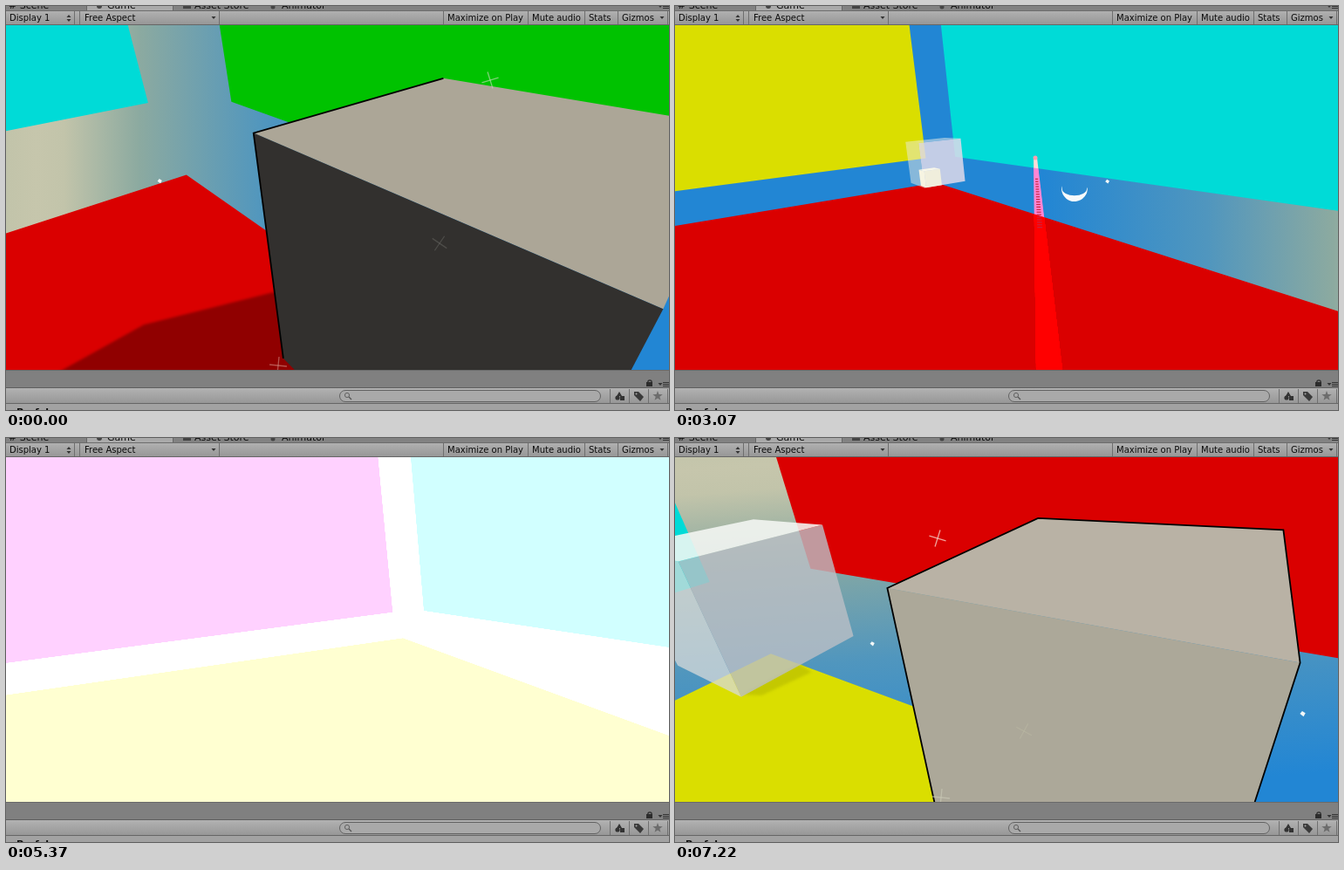
Recreate the animation shown at these times as an HTML page with a canvas. Size 760x463 px, loop 7290 ms.

```html
<!DOCTYPE html>
<html lang="en">
<meta charset="utf-8">
<title>Room with a light beam</title>
<style>
  html, body { margin: 0; width: 100%; height: 100%; overflow: hidden; background: #808080 }
  canvas { display: block }
</style>
<canvas id="stage" width="760" height="463"></canvas>
<script>
const ctx = document.getElementById('stage').getContext('2d');
const LOOP = 7290, STEPS = 95, TURN = 70;      // TURN: step at which gravity has changed
const TOP = 22, BOTTOM = 417, MID_X = 380, MID_Y = 219.5;
const FOCAL = 445, NEAR = .05, RAD = Math.PI / 180;
const CYAN = '#00dbd7', RED = '#da0000', YELLOW = '#dade00', GREEN = '#00c200', MAGENTA = '#da00da', SHADE = '#900000';
const clamp = v => Math.max(0, Math.min(1, v));

// Room in units of eye height: every wall carries a square panel, inset by GAP
const GAP = .37, LEFT = -5.9, RIGHT = .77, FRONT = -4.52, BACK = 2.15, CEILING = 7;
const WALL_L = LEFT - GAP, WALL_R = RIGHT + GAP, WALL_B = BACK + GAP;
const BLOCK = { x: .41, z: -.05, size: .72 };

// step, yaw, pitch, roll, x, z
const VIEWS = [
  [0, 42.5, 29, 1.4, 0, -.04],
  [14, 13, 26, 3.3, 0, .05],
  [27, -36, 17, 3.5, -.17, -.05],
  [53, -85.1, 7.6, 5.8, .12, .24],
  [65, -80.4, 7.3, 6.5, -.24, .19],
  [70, -80.4, 7.3, 6.5, -.24, .19],
  [83, 28, 5.5, 7.6, -.23, .02],
  [94, 57.5, 27, 4.3, -.12, .04]];

// step, tip x, tip y, base x
const BEAM = [[5, 472, 82, 447], [14, 472, 82, 447], [27, 477, 185, 469], [53, 349, 163, 389], [65, 336, 171, 382]];

function at(list, n) {
  let i = 0;
  while (i < list.length - 2 && n >= list[i + 1][0]) i++;
  const a = list[i], b = list[i + 1], u = clamp((n - a[0]) / (b[0] - a[0]));
  return a.map((v, k) => v + (b[k] - v) * u).slice(1);
}

let cam;

function aim(n) {
  const [yaw, pitch, roll, x, z] = at(VIEWS, n);
  cam = { x, z, yaw: yaw * RAD, pitch: pitch * RAD };
  [['y', yaw], ['p', pitch], ['r', roll]].forEach(([k, deg]) => {
    cam['s' + k] = Math.sin(deg * RAD);
    cam['c' + k] = Math.cos(deg * RAD);
  });
}

function toCamera([x, y, z]) {
  const dx = x - cam.x, dy = y - 1, dz = z - cam.z;
  const ahead = dx * cam.sy + dz * cam.cy;
  return [dx * cam.cy - dz * cam.sy, ahead * cam.sp + dy * cam.cp, ahead * cam.cp - dy * cam.sp];
}

function toScreen([x, y, z]) {
  const px = FOCAL * x / z, py = FOCAL * y / z;
  return [MID_X + px * cam.cr - py * cam.sr, MID_Y - px * cam.sr - py * cam.cr];
}

// Point on the left wall seen at a place on the screen
function hitLeft(sx, sy) {
  const u = sx - MID_X, v = sy - MID_Y;
  const b = (u * cam.cr - v * cam.sr) / FOCAL, h = (-u * cam.sr - v * cam.cr) / FOCAL;
  const ahead = cam.cp + h * cam.sp, up = h * cam.cp - cam.sp;
  const t = (WALL_L - cam.x) / (ahead * cam.sy + b * cam.cy);
  return [1 + up * t, cam.z + (ahead * cam.cy - b * cam.sy) * t];
}

// Projects a polygon or line, cut off at the near plane
function project(points, closed = true) {
  const v = points.map(toCamera), out = [];
  v.forEach((a, i) => {
    const b = v[i + 1] || (closed && v[0]);
    if (a[2] > NEAR) out.push(a);
    if (b && (a[2] > NEAR) !== (b[2] > NEAR)) {
      const t = (NEAR - a[2]) / (b[2] - a[2]);
      out.push(a.map((q, k) => q + (b[k] - q) * t));
    }
  });
  return out.map(toScreen);
}

function trace(points) {
  ctx.beginPath();
  points.forEach(p => ctx.lineTo(...p));
}

function poly(points, fill) {
  trace(points);
  ctx.fillStyle = fill;
  ctx.fill();
}

function line(points, color, width) {
  trace(points);
  ctx.strokeStyle = color;
  ctx.lineWidth = width;
  ctx.stroke();
}

function disc(x, y, r, fill) {
  ctx.beginPath();
  ctx.arc(x, y, r, 0, 7);
  ctx.fillStyle = fill;
  ctx.fill();
}

const face = (points, fill) => poly(project(points), fill);
const flat = (y, x0, x1, z0, z1) => [[x0, y, z0], [x0, y, z1], [x1, y, z1], [x1, y, z0]];
const side = (x, y0, y1, z0, z1) => [[x, y0, z0], [x, y0, z1], [x, y1, z1], [x, y1, z0]];
const facing = (z, x0, x1, y0, y1) => [[x0, y0, z], [x1, y0, z], [x1, y1, z], [x0, y1, z]];

function soft(points, fill) {
  ctx.filter = 'blur(1.5px)';
  face(points, fill);
  ctx.filter = 'none';
}

function speck(...point) {
  const [x, y, depth] = toCamera(point);
  if (depth < NEAR) return;
  const [sx, sy] = toScreen([x, y, depth]), s = 2 + 1.4 / depth;
  poly([[sx - s, sy], [sx - s * .2, sy - s], [sx + s, sy - s * .3], [sx + s * .3, sy + s]], '#f4f8f8');
}

function cross(x, y, tilt, color) {
  const c = 10 * Math.cos(tilt), s = 10 * Math.sin(tilt);
  line([[x - c, y - s], [x + c, y + s]], color, 1.3);
  line([[x + s, y - c], [x - s, y + c]], color, 1.3);
}

// Wall sheen: beige in the middle, blue on both sides
function sheen(x, y, dx, dy) {
  const g = ctx.createLinearGradient(x - dx, y - dy, x + dx, y + dy);
  [[0, '#c6c6ac'], [.07, '#c2c4aa'], [.26, '#8caaa0'], [.58, '#5096be'], [1, '#2286d4']].forEach(([d, c]) => {
    g.addColorStop(.5 - d / 2, c);
    g.addColorStop(.5 + d / 2, c);
  });
  ctx.fillStyle = g;
  ctx.fillRect(0, TOP, 760, BOTTOM - TOP);
}

function panels(floor, left, right) {
  face(flat(0, LEFT, RIGHT, FRONT, BACK), floor);
  face(facing(WALL_B, LEFT, RIGHT, GAP, CEILING), CYAN);
  face(side(WALL_L, GAP, CEILING, FRONT, BACK), left);
  face(side(WALL_R, GAP, CEILING, FRONT, BACK), right);
}

// Outline of the block's shadow; place() puts it on the floor or on a wall
function shadow(place) {
  const edge = [[-.6, 1.08], [.15, 1.11], [.56, .93], [.9, .75], [.9, -.1], [-.6, -.1]];
  soft(edge.map(([d, z]) => place(d, z)), SHADE);
}

function block(y, sideColor, topColor, outlined) {
  const { x, z, size } = BLOCK, x1 = x + size, z1 = z + size, y1 = y + size;
  if (y > 1) face(flat(y, x, x1, z, z1), '#32302e');
  if (y1 < 1) face(flat(y1, x, x1, z, z1), topColor);
  face(side(x, y, y1, z, z1), sideColor);
  const rim = [[x, y, z1], [x, y1, z1], [x1, y1, z1], [x1, y1, z], [x, y1, z], [x, y, z]];
  line(project(rim.slice(0, outlined), false), '#000', 1.8);
}

// Cube against the back; inner = x of the side turned to the viewer
function glass(x, z, size, inner, sideColor, frontColor, topColor) {
  face(side(inner, 0, size, z, z + size), sideColor);
  face(facing(z, x, x + size, 0, size), frontColor);
  face(flat(size, x, x + size, z, z + size), topColor);
}

function moon(...point) {
  const v = toCamera(point);
  if (v[2] < NEAR) return;
  const [x, y] = toScreen(v), r = .128 * FOCAL / v[2];
  ctx.beginPath();
  ctx.arc(x, y, r, -.1, Math.PI + .2);
  ctx.ellipse(x, y, r * .95, r * .55, 0, Math.PI, 0, true);
  ctx.fillStyle = '#f8fbfb';
  ctx.fill();
}

// Glowing frame around the spot where the beam meets the left wall
function portal(x, y) {
  const [h, z] = hitLeft(x, y);
  for (let i = 0; i <= 8; i++) {
    const m = i * .011, q = project(side(WALL_L, h - .67 - m, h + .67 + m, z - 1.43 - m, z + 1.43 + m));
    trace(q);
    ctx.closePath();
    ctx.strokeStyle = `rgba(255,255,255,${.9 - i * .1})`;
    ctx.lineWidth = 1.4;
    ctx.stroke();
  }
  disc(x, y, 11, '#eef000');
}

function beam(n) {
  const [x, y, base] = at(BEAM, n), hit = n >= 47;
  if (hit) portal(x, y);
  ctx.globalCompositeOperation = 'lighter';
  poly([[x - 2, y], [x + 2, y], [base + 15, BOTTOM], [base - 15, BOTTOM]], hit ? '#ffe1e1' : '#f00');
  ctx.globalCompositeOperation = 'source-over';
  if (hit) return disc(x, y, 5, '#fff');
  disc(x, y, 2.5, '#ff9fb0');
  for (let f = .1; f < .33; f += .012) {
    const cx = x + (base - x) * f, cy = y + (BOTTOM - y) * f, w = 1 + 6 * f;
    line([[cx - w, cy], [cx + w, cy]], '#cc2340', 1.2);
  }
}

function firstRoom(n) {
  sheen(MID_X - 465 * cam.yaw, MID_Y, 450, 0);
  panels(RED, YELLOW, GREEN);
  shadow((d, z) => [d, 0, z]);
  block(0, '#32302e', '#aca697', 3);
  glass(WALL_L, 1.85, .67, WALL_L + .67, 'rgba(224,218,234,.85)', 'rgba(235,235,225,.5)', 'rgba(240,240,232,.5)');
  glass(-5.85, 1.88, .25, -5.6, '#f0eedc', '#f6f4e2', '#f8f7ea');
  moon(-2.95, .22, WALL_B);
  speck(.62, 0, 2.18);
  speck(-2.5, .34, WALL_B);
  if (n < 4) {
    ctx.globalAlpha = 1 - n / 4;
    const x = n * 16;
    cross(555 + x, 85, -.3, 'rgba(190,220,180,.65)');
    cross(497 + x, 272, .6, 'rgba(120,120,115,.4)');
    cross(312 + x, 412, .1, 'rgba(215,150,140,.55)');
    ctx.globalAlpha = 1;
  }
  if (n >= 5 && n < 62) beam(n);
}

function secondRoom(n) {
  sheen(MID_X, MID_Y - FOCAL * cam.pitch, 400 * cam.sr, 400 * cam.cr);
  panels(YELLOW, MAGENTA, RED);
  const drop = Math.max(0, 6.5 * (1 - ((n - 65) / 19.65) ** 2));
  shadow((d, z) => [WALL_R, Math.max(GAP, drop + d - .5), z]);
  soft([[.48, 0, 1.9], [.52, 0, 1.8], [.75, 0, 1.76], [.77, 0, 1.9]], '#c4c800');
  glass(.47, 1.88, .64, .47, 'rgba(215,218,218,.75)', 'rgba(188,192,198,.8)', 'rgba(245,248,244,.88)');
  speck(1, 1.755, WALL_B);
  speck(-.25, .27, WALL_B);
  speck(1.09, 0, 1.7);
  speck(WALL_R, .16, -.22);
  block(drop, '#aca899', '#b9b2a5', 6);
  if (n > 90) {
    ctx.globalAlpha = clamp((n - 90) / 4);
    const x = (94 - n) * 20;
    cross(301 + x, 115, .3, 'rgba(245,205,195,.8)');
    cross(400 + x, 336, .5, 'rgba(190,188,165,.5)');
    cross(305 + x, 412, .1, 'rgba(200,198,180,.7)');
    ctx.globalAlpha = 1;
  }
}

function whiten(amount) {
  const v = Math.round(255 * clamp(amount));
  ctx.globalCompositeOperation = 'lighter';
  ctx.fillStyle = `rgb(${v},${v},${v})`;
  ctx.fillRect(0, TOP, 760, BOTTOM - TOP);
  ctx.globalCompositeOperation = 'source-over';
}

const rect = (x, y, w, h, c) => { ctx.fillStyle = c; ctx.fillRect(x, y, w, h); };

function bar(y, h) {
  const g = ctx.createLinearGradient(0, y, 0, y + h);
  g.addColorStop(0, '#b2b2b2');
  g.addColorStop(1, '#979797');
  rect(0, y, 760, h, g);
}

function label(text, x, y, font = '10px') {
  ctx.font = font + ' "DejaVu Sans", sans-serif';
  ctx.fillStyle = '#0c0c0c';
  ctx.fillText(text, x, y);
}

const arrow = (x, y, h = 3) => poly([[x - 2.5, y], [x + 2.5, y], [x, y + h]], '#333');

function menu(y) {
  arrow(750, y + 1);
  for (let i = 0; i < 3; i++) rect(753, y + i * 2, 7, 1, '#333');
}

function topBars() {
  rect(0, 0, 760, 5, '#828282');
  rect(93, 0, 98, 5, '#aaa');
  [92, 191].forEach(x => rect(x, 0, 1, 5, '#666'));
  [['# Scene', 3], ['Game', 116], ['Asset Store', 216], ['Animator', 316]].forEach(([t, x]) => label(t, x, 3, '11px'));
  disc(107, 0, 3, '#444');
  rect(203, 0, 9, 3, '#444');
  disc(306, 1, 2.5, '#444');
  menu(-2);
  bar(5, 16);
  rect(0, 5, 760, 1, '#6c6c6c');
  rect(0, 21, 760, 1, '#666');
  [78, 84, 244, 501, 598, 663, 701, 758].forEach(x => rect(x, 6, 1, 15, '#6e6e6e'));
  [['Display 1', 4], ['Free Aspect', 90], ['Maximize on Play', 506], ['Mute audio', 603], ['Stats', 668], ['Gizmos', 706]]
    .forEach(([t, x]) => label(t, x, 17));
  arrow(72, 13, -3);
  arrow(72, 15);
  arrow(238, 12);
  arrow(752, 12);
}

function bottomBars() {
  rect(0, 417, 760, 21, '#808080');
  rect(0, 417, 760, 1, '#6a6a6a');
  rect(734, 431, 7, 5, '#2c2c2c');
  ctx.beginPath();
  ctx.arc(738, 431, 2.2, Math.PI, 0);
  ctx.strokeStyle = '#2c2c2c';
  ctx.lineWidth = 1.2;
  ctx.stroke();
  menu(431);
  bar(438, 17);
  rect(0, 437, 760, 1, '#5e5e5e');
  rect(0, 455, 760, 1, '#666');
  rect(0, 456, 760, 7, '#a2a2a2');

  ctx.beginPath();
  ctx.roundRect(382.5, 440.5, 299, 13, 6.5);
  ctx.fillStyle = '#a9a9a9';
  ctx.fill();
  ctx.strokeStyle = '#626262';
  ctx.lineWidth = 1;
  ctx.stroke();
  ctx.beginPath();
  ctx.arc(391, 446, 2.6, 0, 7);
  ctx.stroke();
  line([[393, 448], [396, 451]], '#555', 1.3);

  [692, 714, 736, 758].forEach(x => rect(x, 439, 1, 16, '#707070'));
  poly([[700, 447], [703, 442], [706, 447]], '#333');
  disc(701, 449, 2.6, '#333');
  rect(704, 447, 5, 5, '#333');
  poly([[720, 442], [725, 442], [731, 448], [727, 453], [720, 446]], '#3a3a3a');
  disc(722.5, 444.5, 1, '#aaa');
  poly(Array.from({ length: 10 }, (_, i) => {
    const r = i % 2 ? 2.4 : 6, a = i * Math.PI / 5;
    return [747 + r * Math.sin(a), 447 - r * Math.cos(a)];
  }), '#6c6c6c');
  label('Prefabs', 12, 469, 'bold 11px');
}

function draw(now) {
  const n = Math.floor((now % LOOP) / LOOP * STEPS + .06) % STEPS;
  aim(n);
  ctx.save();
  ctx.beginPath();
  ctx.rect(0, TOP, 760, BOTTOM - TOP);
  ctx.clip();
  if (n < TURN) {
    firstRoom(n);
    whiten((n - 60) / 5);
  } else {
    secondRoom(n);
    whiten((75.5 - n) * .149);
  }
  ctx.restore();
  topBars();
  bottomBars();
}

const start = performance.now();
function tick() {
  draw(performance.now() - start);
  requestAnimationFrame(tick);
}
tick();
</script>
</html>
```
